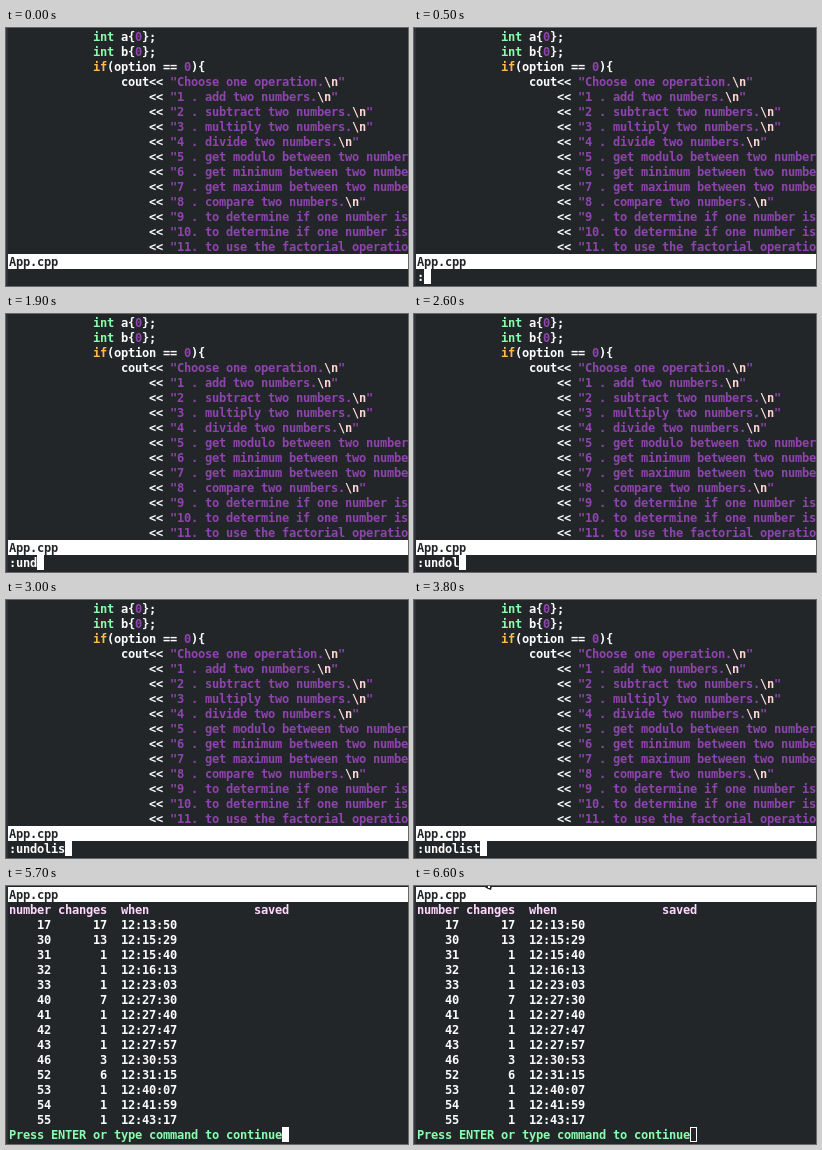
These frames come from a looping animation (402 by 258 pixels, 6700 ms). An HTML page with a canvas:

```html
<!DOCTYPE html>
<html lang="en">
<head>
<meta charset="utf-8">
<title>Undo list</title>
<style>
  html, body { margin: 0; width: 100%; height: 100%; overflow: hidden; background: #232629; }
  canvas { display: block; }
</style>
</head>
<body>
<canvas id="stage" width="402" height="258"></canvas>
<script>
const ctx = document.getElementById('stage').getContext('2d');
const W = 402, H = 258, LOOP = 6700;
const CELL = 7, LINE = 15, LEFT = 3, TOP = 1;
const BG = '#232629', WHITE = '#fcfcfc', GREEN = '#87ffaf', PURPLE = '#8e44ad',
      AMBER = '#fdbc4b', PINK = '#ffd7ff', ESCAPE = '#ffd7d7';

const MENU = [
  'Choose one operation.\\n',
  '1 . add two numbers.\\n',
  '2 . subtract two numbers.\\n',
  '3 . multiply two numbers.\\n',
  '4 . divide two numbers.\\n',
  '5 . get modulo between two numbers',
  '6 . get minimum between two numbers',
  '7 . get maximum between two numbers',
  '8 . compare two numbers.\\n',
  '9 . to determine if one number is ',
  '10. to determine if one number is ',
  '11. to use the factorial operation'
];

const UNDO = `17 17 12:13:50
30 13 12:15:29
31 1 12:15:40
32 1 12:16:13
33 1 12:23:03
40 7 12:27:30
41 1 12:27:40
42 1 12:27:47
43 1 12:27:57
46 3 12:30:53
52 6 12:31:15
53 1 12:40:07
54 1 12:41:59
55 1 12:43:17`.split('\n').map(row => row.split(' '));

const COMMAND = ':undolist';
const KEY_TIMES = [300, 1500, 1700, 1900, 2100, 2500, 2700, 2900, 3200];
const LIST_AT = 4000, POINTER_AT = 6400, BLUR_AT = 6600;

const cellX = col => LEFT + col * CELL;
const cellY = row => TOP + row * LINE;

// Writes runs of [text, colour] on the character grid.
function put(row, col, ...runs) {
  for (const [text, color = WHITE] of runs) {
    ctx.fillStyle = color;
    for (const ch of text) {
      if (ch !== ' ') ctx.fillText(ch, cellX(col), cellY(row) + 12);
      col++;
    }
  }
}

function statusBar(row) {
  ctx.fillStyle = '#fff';
  ctx.fillRect(2, cellY(row), W - 2, LINE);
  put(row, 0, ['App.cpp', BG]);
}

function cursor(row, col, hollow) {
  const x = cellX(col), y = cellY(row);
  if (hollow) {
    ctx.strokeStyle = '#fff';
    ctx.lineWidth = 1;
    ctx.strokeRect(x + 0.5, y + 0.5, CELL - 1, LINE - 1);
  } else {
    ctx.fillStyle = '#fff';
    ctx.fillRect(x, y, CELL, LINE);
  }
}

// Only the tail of the mouse pointer reaches into the stage.
function pointerTail() {
  ctx.fillStyle = BG;
  ctx.beginPath();
  ctx.moveTo(69, 0);
  ctx.lineTo(78, 0);
  ctx.lineTo(77, 4);
  ctx.lineTo(74, 3);
  ctx.closePath();
  ctx.fill();
  ctx.fillStyle = '#fff';
  ctx.fillRect(74, 0, 2, 2);
}

function drawEditor(t) {
  ['a', 'b'].forEach((name, row) =>
    put(row, 12, ['int', GREEN], [` ${name}{`], ['0', PURPLE], ['};']));
  put(2, 12, ['if', AMBER], ['(option == '], ['0', PURPLE], ['){']);
  put(3, 16, ['cout']);
  MENU.forEach((text, i) => {
    const [body, end] = text.split('\\n');
    const runs = [['<< '], ['"' + body, PURPLE]];
    if (end !== undefined) runs.push(['\\n', ESCAPE], ['"', PURPLE]);
    put(3 + i, 20, ...runs);
  });
  statusBar(15);
  const typed = KEY_TIMES.filter(at => t >= at).length;
  if (typed) {
    put(16, 0, [COMMAND.slice(0, typed)]);
    cursor(16, typed);
  }
}

function drawList(t) {
  statusBar(0);
  put(1, 0, ['number changes  when', PINK]);
  put(1, 35, ['saved', PINK]);
  UNDO.forEach(([num, changes, when], i) =>
    put(2 + i, 0, [num.padStart(6) + changes.padStart(8) + '  ' + when]));
  const prompt = 'Press ENTER or type command to continue';
  put(16, 0, [prompt, GREEN]);
  cursor(16, prompt.length, t >= BLUR_AT);
  if (t >= POINTER_AT) pointerTail();
}

function draw(t) {
  ctx.fillStyle = BG;
  ctx.fillRect(0, 0, W, H);
  ctx.fillStyle = '#2d313a';
  ctx.fillRect(0, 0, 2, H);
  ctx.font = 'bold 12px "DejaVu Sans Mono", monospace';
  ctx.textBaseline = 'alphabetic';
  if (t < LIST_AT) drawEditor(t);
  else drawList(t);
}

const start = performance.now();
function tick() {
  draw((performance.now() - start) % LOOP);
  requestAnimationFrame(tick);
}
tick();
</script>
</body>
</html>
```
